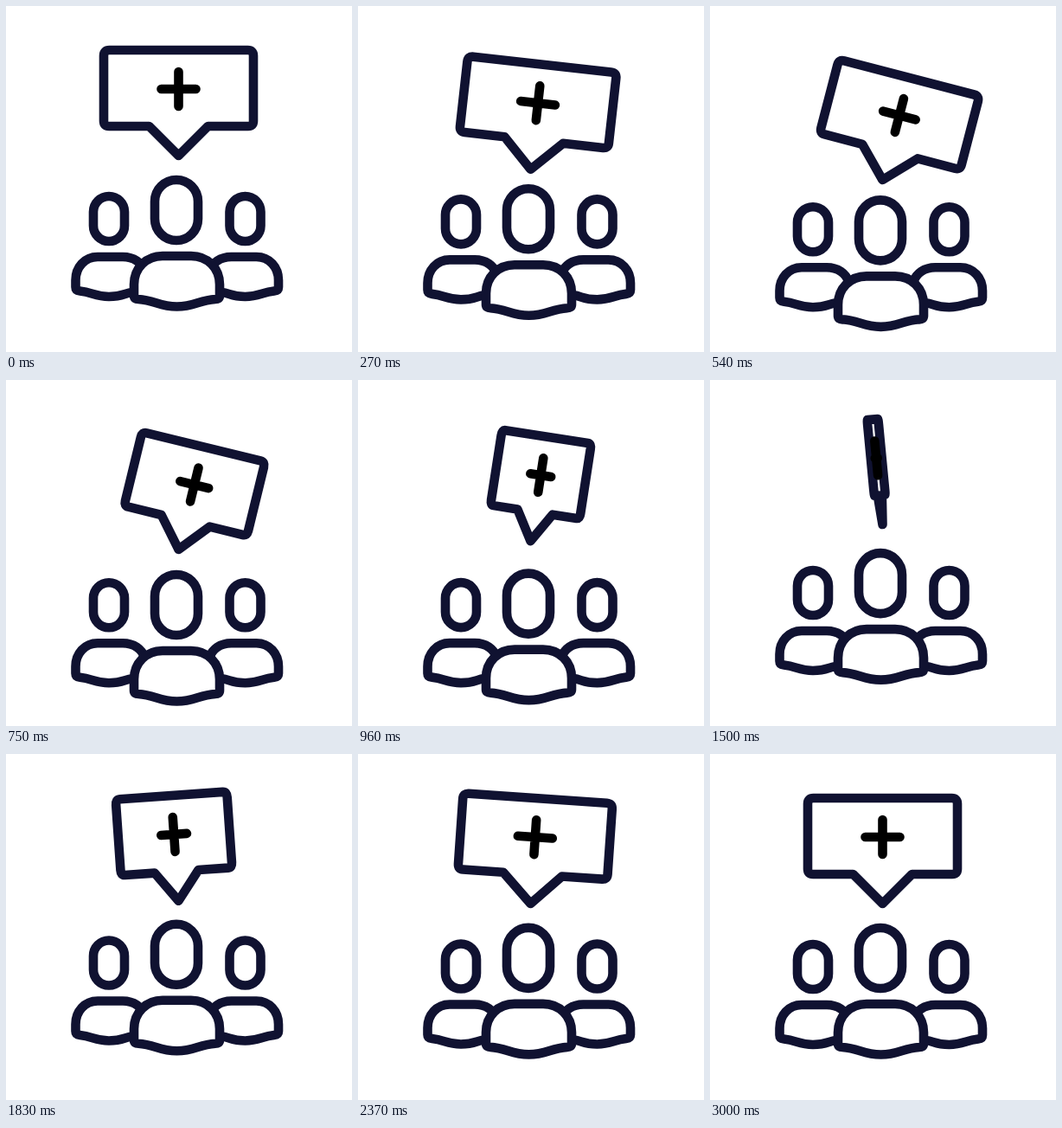
These frames come from a looping animation (400 px wide and 400 px high, 5.09 s). An HTML page:

```html
<!DOCTYPE html>
<html lang="en">
<head>
<meta charset="utf-8">
<title>Group with speech bubble</title>
<style>
  html, body { margin: 0; height: 100%; overflow: hidden; background: #fff; }
  svg { display: block; width: 100vw; height: 100vh; }
  path, rect {
    fill: none; stroke: #101231; stroke-width: 10.6;
    stroke-linecap: round; stroke-linejoin: round;
    vector-effect: non-scaling-stroke;
  }
  #plus { stroke: #000; }
  #leader path { fill: #fff; }
</style>
</head>
<body>
<svg viewBox="0 0 400 400">
  <g id="members">
    <g id="member">
      <rect x="101" y="220" width="36" height="52" rx="18"/>
      <path d="M160 306C157 297 148 290 135 290H106C91 290 80.5 302 80.5 317V325q0 4 5 4.5C100 331 103 336 119 336S137 332 146 331"/>
    </g>
    <use href="#member" transform="translate(395.5) scale(-1 1)"/>
  </g>
  <g id="leader">
    <rect x="172" y="201" width="50" height="70" rx="25"/>
    <path d="M148 335V322C148 303 162 289 181 289H214C233 289 247 303 247 322V335q0 4 -5 4C223 340 218 347.5 197.5 347.5S172 340 153 339q-5 0 -5 -4z"/>
  </g>
  <!-- The bubble's tip is its origin. -->
  <g id="bubble">
    <path d="M-80 -122H80q6.5 0 6.5 6.5V-40q0 6 -6 6H34L0 0 -34 -34H-80.5q-6 0 -6 -6V-115.5q0 -6.5 6.5 -6.5z"/>
    <path id="plus" d="M-20 -77H20M0 -97V-57"/>
  </g>
</svg>
<script>
  const LOOP = 5090, MOTION = 3000, STEP = 30;

  // Eased progress from 0 to 1 between two times.
  function ease(t, from, to) {
    const u = Math.min(1, Math.max(0, (t - from) / (to - from)));
    return u * u * (3 - 2 * u);
  }

  // Sink to a depth, rebound a little above the resting place, settle.
  function bob(t, depth, rebound = 4.6) {
    return depth * ease(t, 0, 600)
      - (depth + rebound) * ease(t, 850, 1690)
      + rebound * ease(t, 1690, 2450);
  }

  const bubbleY = t =>
    28.2 * ease(t, 0, 500) - 34.2 * ease(t, 500, 1500) + 6 * ease(t, 1500, 2200);

  const tilt = t =>
    15 * ease(t, 0, 600) - 21 * ease(t, 600, 1600)
    + 10 * ease(t, 1600, 2400) - 4 * ease(t, 2400, 3000);

  // Half a turn about the upright axis, in two quarter turns.
  function bubbleWidth(t) {
    const angle = Math.PI / 2 * (ease(t, 200, 1560) + ease(t, 1380, 2240));
    return Math.max(0.01, Math.abs(Math.cos(angle)));
  }

  const place = (id, transform) =>
    document.getElementById(id).setAttribute("transform", transform);

  const start = performance.now();
  function draw(now) {
    const elapsed = Math.max(0, now - start) % LOOP;
    const t = Math.min(MOTION, Math.floor(elapsed / STEP) * STEP);
    place("leader", `translate(0 ${bob(t, 24)})`);
    place("members", `translate(0 ${bob(t - 80, 14.2)})`);
    place("bubble",
      `translate(199.5 ${173 + bubbleY(t)}) rotate(${tilt(t)}) scale(${bubbleWidth(t)} 1)`);
    requestAnimationFrame(draw);
  }
  draw(start);
</script>
</body>
</html>
```
